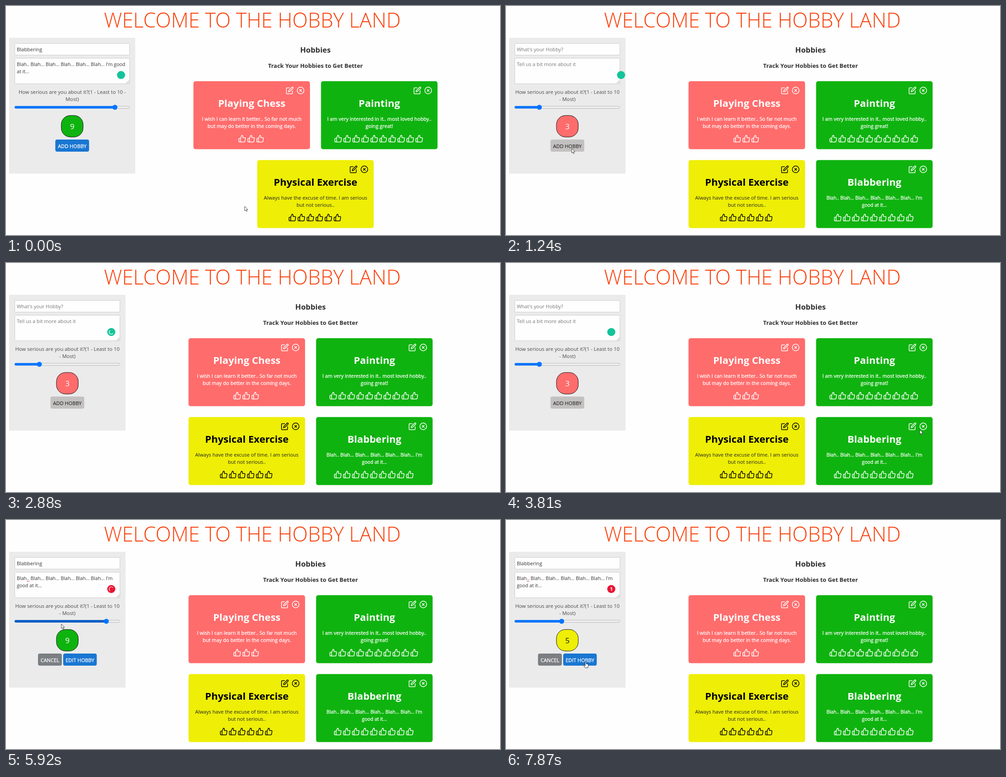
Animation of 1097 by 511 pixels, one loop 8000 ms. Source, as an HTML page:

```html
<!DOCTYPE html>
<html lang="en">
<head>
<meta charset="utf-8">
<title>Hobby Land</title>
<style>
html, body { margin: 0; width: 100%; height: 100%; overflow: hidden; background: #fefefe; }
svg { display: block; width: 1097px; height: 511px; }
text { font-family: "Open Sans", "Noto Sans", sans-serif; font-size: 11.1px; white-space: pre; }
.mid { text-anchor: middle; }
.bold { font-weight: 700; }
.title { font-size: 45.1px; font-weight: 300; fill: #fc3f0a; }
.h2 { font-size: 16.8px; fill: #2f2f2f; }
.h3 { font-size: 12.9px; fill: #2f2f2f; }
.name { font-size: 22.1px; }
.blah { font-size: 10.7px; }
.bright { stroke: #fff; stroke-width: .3px; }
.level { font-size: 17px; }
.label { font-size: 11.25px; fill: #4a4a4a; }
.field { fill: #fefefe; stroke: #ccc; }
.icon { fill: none; stroke-width: 2; stroke-linecap: round; stroke-linejoin: round; }
</style>
</head>
<body>
<svg viewBox="0 0 1097 511">
  <defs>
    <path id="thumb" d="M14 9V5a3 3 0 0 0-3-3l-4 9v11h11.28a2 2 0 0 0 2-1.7l1.38-9a2 2 0 0 0-2-2.3zM7 22H4a2 2 0 0 1-2-2v-7a2 2 0 0 1 2-2h3"/>
    <path id="edit" d="M11 4H4a2 2 0 0 0-2 2v14a2 2 0 0 0 2 2h14a2 2 0 0 0 2-2v-7M18.5 2.5a2.12 2.12 0 0 1 3 3L12 15l-4 1 1-4z"/>
    <path id="remove" d="M2 12a10 10 0 0 1 20 0a10 10 0 0 1-20 0M15 9l-6 6M9 9l6 6"/>
  </defs>
  <text class="mid title" x="547" y="48">WELCOME TO THE HOBBY LAND</text>
  <g id="list"></g>
  <g id="form"></g>
  <g id="badge"></g>
  <circle id="press" r="9" fill="#f6ec1c" opacity=".72"/>
  <g id="cursor">
    <path id="arrow" d="M0 0V10L2.3 8 4 11.6 5.6 10.9 4 7.4H7Z" fill="#fff" stroke="#222" stroke-width=".8"/>
    <path id="hand" d="M-1.1 1a1.1 1.1 0 0 1 2.2 0V5l3.8.9q1.1.3 1 1.5L5.3 10.5 4.6 14H-.9L-4.3 9.2q-.5-1.1.7-1.3L-1.1 9.5Z" fill="#fff" stroke="#222" stroke-width=".9"/>
    <path id="beam" d="M-2-5H2M0-5V5M-2 5H2" fill="none" stroke="#555"/>
  </g>
</svg>
<script>
const LOOP = 8000, STEP = 77;
const ADDING = 1150, ADDED = 1240, EDITING = 4750, RATED = 6320;
const RED = '#ff6c6c', GREEN = '#0fb30f', YELLOW = '#eeee06', BLUE = '#1976d2';
const $ = id => document.getElementById(id);

const text = (x, y, str, cls = '', fill = '') =>
  `<text x="${x}" y="${y}" class="${cls}"${fill && ` fill="${fill}"`}>${str}</text>`;
const rect = (x, y, w, h, r, attrs) =>
  `<rect x="${x}" y="${y}" width="${w}" height="${h}" rx="${r}" ${attrs}/>`;
const icon = (id, cx, cy, color) =>
  `<use href="#${id}" class="icon" stroke="${color}" transform="translate(${cx - 9} ${cy - 9}) scale(.75)"/>`;

const hobbies = [
  { name: 'Playing Chess', about: ['I wish I can learn it better.. So far not much', 'but may do better in the coming days.'], level: 3, color: RED },
  { name: 'Painting', about: ['I am very interested in it.. most loved hobby..', 'going great!'], level: 10, color: GREEN },
  { name: 'Physical Exercise', about: ['Always have the excuse of time. I am serious', 'but not serious..'], level: 6, color: YELLOW },
  { name: 'Blabbering', about: ["Blah.. Blah... Blah... Blah... Blah... Blah... I'm", 'good at it...'], level: 9, color: GREEN, cls: 'blah' }
];

function card(x, y, { name, about, level, color, cls = '' }) {
  const dark = color === YELLOW, ink = dark ? '#000' : '#fff', mid = x + 129.5;
  const lineClass = `mid ${cls} ${dark ? '' : 'bright'}`;
  let out = rect(x, y - .2, 258.8, 151.8, 5, `fill="${color}"`);
  out += icon('edit', x + 214, y + 20.5, ink) + icon('remove', x + 238, y + 20.5, ink);
  out += text(mid, y + 57.3, name, 'mid bold name', ink);
  about.forEach((line, i) => out += text(mid, y + 88 + 16 * i, line, lineClass, dark ? '#222' : '#fff'));
  for (let i = 0; i < level; i++) out += icon('thumb', mid - 1.3 + 20 * (i - (level - 1) / 2), y + 128, ink);
  return out;
}

function list(added) {
  const mid = added ? 676.3 : 687.2, left = mid - 271;
  const spots = [[left, 168], [left + 283.3, 168], [added ? left : mid - 129.4, 344], [left + 283.3, 344]];
  return text(mid, 104, 'Hobbies', 'mid bold h2') +
    text(mid, 138, 'Track Your Hobbies to Get Better', 'mid bold h3') +
    hobbies.slice(0, added ? 4 : 3).map((h, i) => card(...spots[i], h)).join('');
}

function button(x, w, label, fill, ink = '#fff', border = fill) {
  return rect(x + .5, 298.5, w - 1, 26, 3, `fill="${fill}" stroke="${border}"`) +
    text(x + w / 2, 316.5, label, ink === '#fff' ? 'mid bright' : 'mid', ink);
}

function slider(w, level, hover) {
  const thumb = 24.5 + (w - 11.5) * (level - 1) / 9;
  const fill = hover ? '#005cc8' : '#0075ff';
  return rect(19.5, 223.5, w - 1, 5, 2.5, 'fill="#efefef" stroke="#b8b8b8"') +
    rect(19, 223.2, thumb - 19, 5.6, 2.8, `fill="${fill}"`) +
    `<circle cx="${thumb}" cy="226" r="5.6" fill="#0075ff"/>`;
}

function form({ wide, filled, pressed, editing, level, hover, flagged }) {
  const w = wide ? 280 : 258.5, inner = w - 24, right = 19 + inner, mid = 7 + w / 2;
  const levelColor = level > 6 ? GREEN : level > 3 ? YELLOW : RED;
  const ink = filled ? '#333' : '#777', blahs = 'Blah.. Blah... Blah... Blah... Blah... Blah... I\'m';
  const note = !filled ? ['Tell us a bit more about it', ''] : wide ? [blahs + ' good', 'at it...'] : [blahs, 'good at it...'];
  const label = wide ? ['How serious are you about it?(1 - Least to 10 -', 'Most)'] : ['How serious are you about it?(1 - Least to 10', '- Most)'];
  let out = rect(7, 71, w, 303, 0, 'fill="#ebebeb"');
  out += rect(19.5, 83.5, inner - 1, 26, 1, 'class="field"') + rect(19.5, 116.5, inner - 1, 57, 1, 'class="field"');
  out += text(24, 101, filled ? 'Blabbering' : "What's your Hobby?", '', ink);
  note.forEach((line, i) => out += text(24, 134 + 16 * i, line, filled ? 'blah' : '', ink));
  out += `<path d="M${right - 7.5} 172.5l6-6M${right - 4} 172.5l2.5-2.5" stroke="#777" stroke-width=".8"/>`;
  if (flagged) out += rect(46, 136.3, 6, 1.2, 0, 'fill="#eb5a6e"');
  label.forEach((line, i) => out += text(mid, 195.5 + 16 * i, line, 'mid label'));
  out += slider(inner, level, hover);
  out += rect(mid - 24.2, 244.3, 48.4, 48, 20, `fill="${levelColor}" stroke="#111"`);
  out += text(mid, 275, level, 'mid level', levelColor === YELLOW ? '#111' : '#fff');
  if (editing) return out + button(71, 53, 'CANCEL', '#7b7f83') + button(127, 74.5, 'EDIT HOBBY', BLUE);
  const style = pressed ? ['#dcdcdc', '#fff', '#4a90d9'] : filled ? [BLUE] : ['#c3c0c0', '#111'];
  return out + button(mid - 37.5, 75, 'ADD HOBBY', ...style);
}

function badge(t) {
  const x = t < 1640 ? 255.5 : 233.8;
  const red = t >= 5400;
  const busy = (t >= 1640 && t < 3270) || (t >= 5050 && t < 6600);
  let out = `<circle cx="${x}" cy="154" r="9" fill="${red ? '#eb1435' : '#15c39a'}"/>`;
  if (busy) out += `<path d="M${x - 4.6} 154a4.6 4.6 0 0 1 9.2 0" fill="none" stroke="#fff" stroke-width="1.4" stroke-linecap="round"
    transform="rotate(${(t / 935 * 360 + 196) % 360} ${x} 154)"/>`;
  else if (red) out += text(x, 157.8, '1', 'mid bold', '#fff');
  return out;
}

// Each move: start time, then [step, x, y] points.
const moves = [
  [70, [0, 530, 447], [2, 400, 400], [5, 138, 301], [7, 146, 318]],
  [2500, [0, 146, 318], [2, 290, 332], [6, 816, 388], [8, 945, 400], [11, 1026, 389]],
  [3350, [0, 1026, 389], [5, 935, 376], [9, 903, 368]],
  [5050, [0, 903, 368], [2, 790, 348], [6, 290, 262], [10, 127, 237]],
  [5860, [0, 127, 237], [1, 123, 232], [4, 123, 226]],
  [6860, [0, 123, 226], [4, 138, 252], [8, 170, 302], [11, 177, 310]],
  [7720, [0, 177, 310], [3, 177, 316]]
];

function pointer(t) {
  const move = moves.filter(m => t >= m[0]).pop();
  if (!move) return [530, 447];
  const [start, ...points] = move;
  const step = Math.floor((t - start + 8) / STEP) + 1;
  const next = points.findIndex(p => p[0] >= step);
  if (next < 0) return points[points.length - 1].slice(1);
  const [a, x0, y0] = points[next - 1], [b, x1, y1] = points[next];
  const u = (step - a) / (b - a);
  return [x0 + (x1 - x0) * u, y0 + (y1 - y0) * u];
}

function cursorKind(x, y, t) {
  const inside = (l, r, top, bottom) => x >= l && x <= r && y >= top && y <= bottom;
  const onButton = t < ADDED ? inside(110, 185, 298, 325) : t >= EDITING && inside(71, 202, 298, 325);
  if (onButton || inside(893, 912, 356, 374)) return 'hand';
  return t >= ADDED && inside(757, 878, 378, 406) ? 'beam' : 'arrow';
}

const shown = {};
function put(id, markup) {
  if (shown[id] !== markup) $(id).innerHTML = shown[id] = markup;
}

function draw(t) {
  const [x, y] = pointer(t), editing = t >= EDITING, added = t >= ADDED;
  put('list', list(added));
  put('form', form({
    wide: !added,
    filled: !added || editing,
    pressed: t >= ADDING && !added,
    editing,
    level: t >= RATED ? 5 : added && !editing ? 3 : 9,
    hover: t >= 5860 && y >= 218 && y <= 234,
    flagged: t >= 5400
  }));
  put('badge', badge(t));
  const clicks = [[ADDING, ADDED], [4580, EDITING], [6240, 6400]];
  $('press').style.display = clicks.some(([a, b]) => t >= a && t < b) ? '' : 'none';
  $('press').setAttribute('transform', `translate(${x} ${y + .5})`);
  $('cursor').setAttribute('transform', `translate(${x} ${y})`);
  const kind = cursorKind(x, y, t);
  for (const id of ['arrow', 'hand', 'beam']) $(id).style.display = id === kind ? '' : 'none';
}

const begin = performance.now();
function frame() {
  draw((performance.now() - begin) % LOOP);
  requestAnimationFrame(frame);
}
frame();
</script>
</body>
</html>
```
